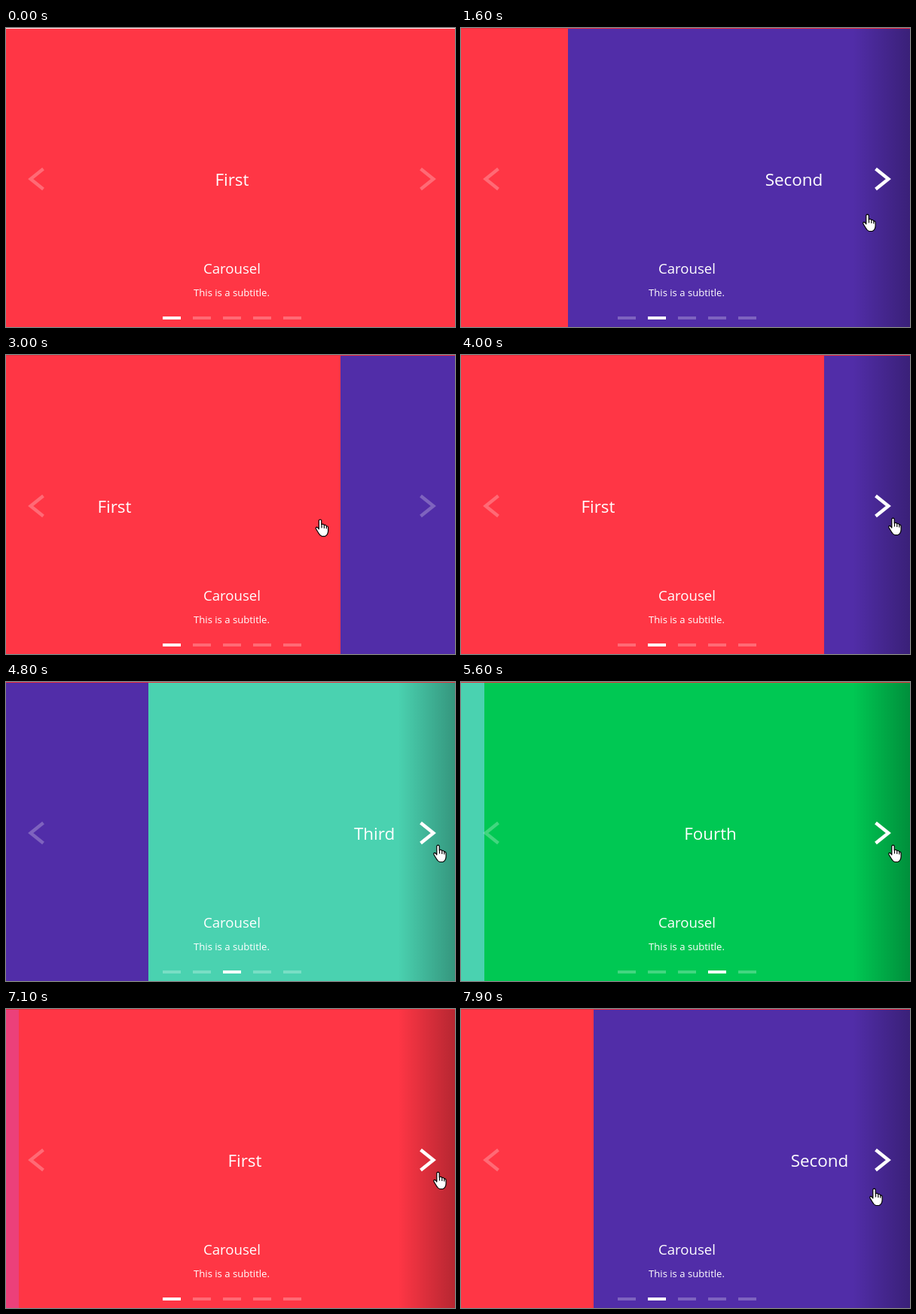
Recreate the animation shown at these times as an HTML page. Size 596 by 398 pixels, loop 8 s.

```html
<!DOCTYPE html>
<html lang="en">
<head>
<meta charset="utf-8">
<title>Carousel</title>
<style>
  html, body { margin: 0; width: 100%; height: 100%; overflow: hidden; }
  svg { display: block; width: 596px; height: 398px; }
  text { font-family: "Open Sans", "Noto Sans", sans-serif; fill: #fff; text-anchor: middle; }
  .name { font-size: 22.4px; }
  .title { font-size: 18.6px; }
  .sub { font-size: 13.1px; }
  .arrow { fill: none; stroke: #fff; stroke-width: 4.5; stroke-miterlimit: 8; }
</style>
</head>
<body>
<svg viewBox="0 0 596 398">
  <defs>
    <linearGradient id="dark">
      <stop offset="0" stop-opacity="0"/>
      <stop offset="1" stop-opacity=".3"/>
    </linearGradient>
  </defs>
  <g id="slides"></g>
  <g id="right"></g>
  <g id="left" transform="translate(600) scale(-1 1)"></g>
  <text class="title" x="300" y="327">Carousel</text>
  <text class="sub" x="299.5" y="357">This is a subtitle.</text>
  <g id="dots" fill="#fff"></g>
  <rect id="edge" width="596" height="1"/>
  <path id="hand" fill="#fff" stroke="#000" stroke-width="1.2" stroke-linejoin="round"
    d="M-1.7 1.4Q0-1 1.7 1.4V7Q4 5.2 5.2 7.8Q7.2 6.6 8.2 9Q10.6 8.6 10.6 11.2V15.5Q10.4 20.5 6.5 22.5H2.2Q-.6 21.5-2.2 18.2L-5.4 13Q-6.4 10.6-4.4 10.4Q-3.2 10.6-1.7 13ZM2 7V11.5M5.3 8V12M8.3 9.2V12.5"/>
</svg>
<script>
const LOOP = 8000, WIDTH = 600, HEIGHT = 398, SLIDE_MS = 600, LAG = 45;
const SLIDES = {
  First: "#ff3645", Second: "#512da8", Third: "#4ad2b0", Fourth: "#00c853", Fifth: "#ec407a"
};
const COUNT = Object.keys(SLIDES).length;

// when each slide change begins; a negative time goes backwards
const TURNS = [1235, -2642, 3781, 4458, 5142, 5902, 6616, 7552];

// hand moves: from, to, and where it ends
const HAND_START = { x: 560, y: 430 };
const HAND_MOVES = [
  { from: 100, to: 900, x: 546, y: 240 },
  { from: 1100, to: 1500, x: 539.5, y: 248 },
  { from: 1700, to: 2400, x: 48.5, y: 223 },
  { from: 2650, to: 3200, x: 573.5, y: 217 },
  { from: 7440, to: 7900, x: 548.5, y: 239 }
];

const $ = id => document.getElementById(id);
const clamp = v => Math.max(0, Math.min(1, v));
const smooth = u => u * u * (3 - 2 * u);
const cubic = u => u < .5 ? 4 * u ** 3 : 1 - 4 * (1 - u) ** 3;
const glow = on => .26 + .74 * on;

function add(parent, tag, attrs, text) {
  const el = document.createElementNS("http://www.w3.org/2000/svg", tag);
  for (const key in attrs) el.setAttribute(key, attrs[key]);
  if (text) el.textContent = text;
  return parent.appendChild(el);
}

const slides = [], dots = [];
Object.entries(SLIDES).forEach(([name, fill], i) => {
  const g = add($("slides"), "g", {});
  add(g, "rect", { width: WIDTH, height: HEIGHT, fill });
  add(g, "text", { class: "name", x: 300, y: 210 }, name);
  slides.push(g);
  dots.push(add($("dots"), "rect", { x: 208 + i * 40, y: 384, width: 24, height: 4 }));
});

function makeSide(id) {
  const shade = add($(id), "rect", { x: 520, width: 80, height: HEIGHT, fill: "url(#dark)" });
  const arrow = add($(id), "path", { class: "arrow", d: "M550.5 187.5L567.3 201L550.5 214.5" });
  return on => {
    shade.setAttribute("opacity", on);
    arrow.setAttribute("opacity", glow(on));
  };
}
const setRight = makeSide("right"), setLeft = makeSide("left");

// sum of all turns, each passed through a step or an easing
const position = (t, step) => TURNS.reduce(
  (sum, turn) => sum + Math.sign(turn) * step(t - Math.abs(turn)), 0);

function drawSlides(t) {
  const pos = position(t, dt => cubic(clamp(dt / SLIDE_MS)));
  const active = position(t, dt => dt >= -LAG ? 1 : 0) % COUNT;
  slides.forEach((slide, i) => {
    // wrap the distance so the last slide is followed by the first
    const d = (i - pos + 2 * COUNT + 1) % COUNT - 1;
    slide.setAttribute("transform", `translate(${Math.round(d * WIDTH)})`);
    dots[i].setAttribute("opacity", glow(i === active ? 1 : 0));
  });
}

function handAt(t) {
  let { x, y } = HAND_START;
  for (const m of HAND_MOVES) {
    const u = smooth(clamp((t - m.from) / (m.to - m.from)));
    x += (m.x - x) * u;
    y += (m.y - y) * u;
  }
  return { x, y };
}

function drawHand(t) {
  const { x, y } = handAt(t);
  const inside = clamp((HEIGHT - y) / 30);
  $("hand").setAttribute("transform", `translate(${x} ${y})`);
  setRight(inside * clamp((x - 500) / 30));
  setLeft(inside * clamp((100 - x) / 30));
}

function draw(t) {
  drawSlides(t);
  drawHand(t);
  $("edge").setAttribute("fill", t < 1100 ? "#ffe9ec" : "#e8303f");
}

const begin = performance.now();
function tick() {
  draw((performance.now() - begin) % LOOP);
  requestAnimationFrame(tick);
}
tick();
</script>
</body>
</html>
```
